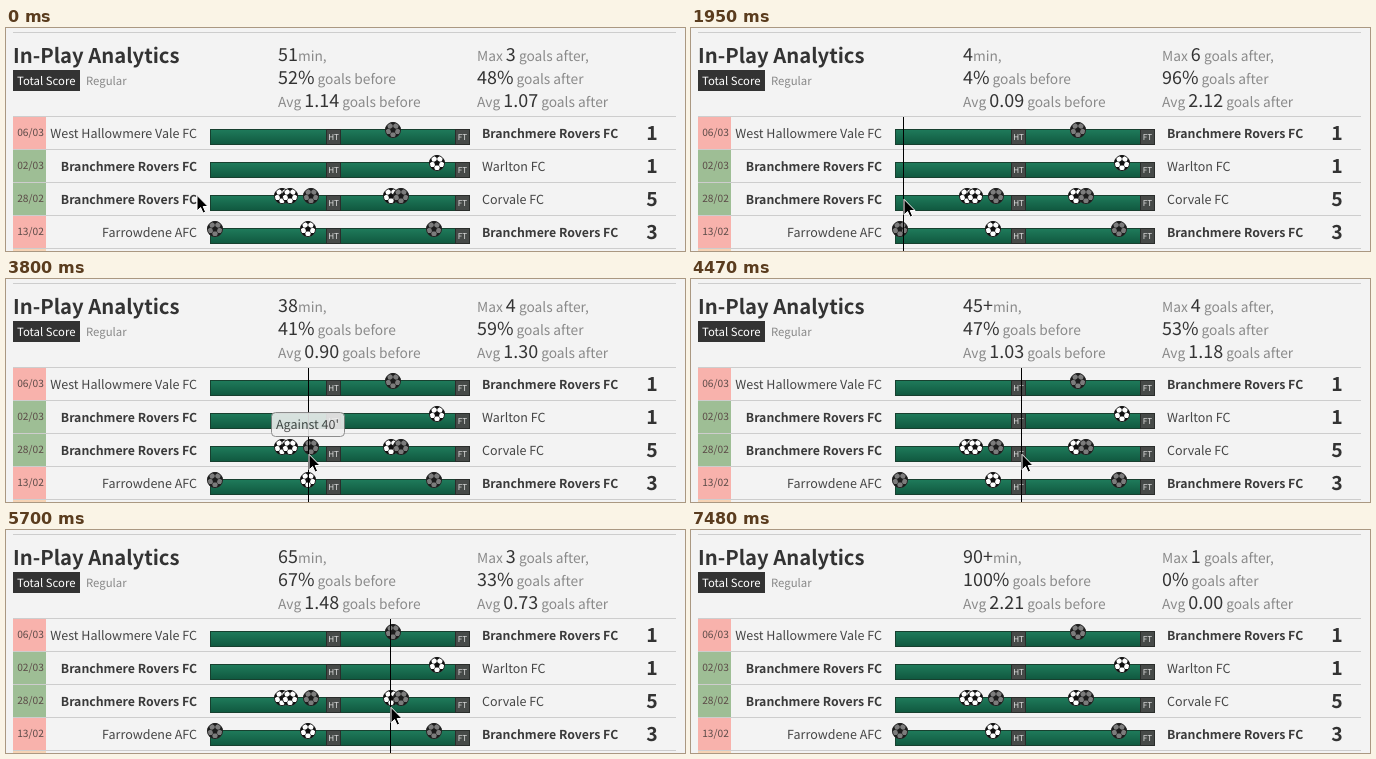
Write an HTML page that moves like this. It is 679 by 223 pixels and loops after 8.22 s.

```html
<!DOCTYPE html>
<html lang="en">
<head>
<meta charset="utf-8">
<title>In-Play Analytics</title>
<style>
html, body { margin: 0; width: 100%; height: 100%; overflow: hidden; background: #f3f3f3; }
svg { display: block; }
text {
  font-family: "Noto Sans CJK JP", "Noto Sans CJK SC", "Noto Sans CJK", "Open Sans", sans-serif;
  white-space: pre; text-rendering: geometricPrecision; fill: #444; font-size: 12.5px;
}
.title { font-size: 20.25px; font-weight: 700; fill: #333; }
.tab { font-size: 11.35px; fill: #888; }
.stat { font-size: 13.75px; fill: #8a8a8a; }
.stat .num { font-size: 17.95px; fill: #333; }
.date { font-size: 10.2px; fill: #5c4b48; text-anchor: middle; }
.home { text-anchor: end; }
.own { font-size: 12.3px; font-weight: 700; fill: #3a3a3a; }
.score { font-size: 19.4px; font-weight: 700; fill: #333; text-anchor: middle; }
.mark { font-size: 8.1px; fill: #e4e4e4; text-anchor: middle; }
</style>
</head>
<body>
<svg id="stage" width="679" height="223" viewBox="0 0 679 223"></svg>
<script>
const LOOP = 8220;
const TOP = 88, ROW = 33;                 // first row and row height
const KICK = 204, HALF = 320, SECOND = 334, FULL = 464;   // pitch x positions
const OWN = "Branchmere Rovers FC";
const LOST = "#f8b2ac", WON = "#9ebe95";

// balls for and against the own team, as x positions
const games = [
  { date: "06/03", tint: LOST, home: "West Hallowmere Vale FC", away: OWN, score: 1, own: [], against: [387] },
  { date: "02/03", tint: WON, home: OWN, away: "Warlton FC", score: 1, own: [431], against: [] },
  { date: "28/02", tint: WON, home: OWN, away: "Corvale FC", score: 5, own: [276, 284, 385], against: [305, 395] },
  { date: "13/02", tint: LOST, home: "Farrowdene AFC", away: OWN, score: 3, own: [302], against: [209, 428] }
];

// pointer moves; it rests in between
const rest = { x: 190, y: 167 };
const moves = [
  { from: 200, to: 640, x: 210, y: 167 },
  { from: 780, to: 1030, x: 233, y: 166 },
  { from: 1300, to: 1410, x: 234, y: 169 },
  { from: 1650, to: 1950, x: 212, y: 171 },
  { from: 2460, to: 2860, x: 234, y: 171 },
  { from: 2860, to: 3800, x: 302, y: 175 },
  { from: 3800, to: 5130, x: 358, y: 175 },
  { from: 5130, to: 6330, x: 413, y: 179 },
  { from: 6810, to: 7480, x: 470, y: 227 }
];
const HOVER_FROM = moves[3].from;

// average goals scored up to a minute
const TOTAL = 2.206;
const goals = [[0, 0], [12, .262], [38, .902], [51, 1.138], [55, 1.278], [77, 1.722], [91, TOTAL]];

const rect = (x, y, w, h, fill, more = "") =>
  `<rect x="${x}" y="${y}" width="${w}" height="${h}" fill="${fill}" ${more}/>`;
const text = (x, y, cls, str, more = "") =>
  `<text x="${x}" y="${y}" class="${cls}" ${more}>${str}</text>`;
const polar = (r, deg) => [r * Math.cos(deg * Math.PI / 180), r * Math.sin(deg * Math.PI / 180)];
const fifths = [0, 1, 2, 3, 4].map(i => 72 * i - 90);

function pentagon(cx, cy, r, turn) {
  const pts = fifths.map(a => {
    const [x, y] = polar(r, a + turn);
    return `${(cx + x).toFixed(2)},${(cy + y).toFixed(2)}`;
  });
  return `<polygon points="${pts.join(" ")}"/>`;
}

function ballSymbol(id, skin, ink) {
  const patches = fifths.map(a => pentagon(...polar(7.6, a), 2.6, a - 90)).join("");
  const seams = fifths.map(a => "M0 0L" + polar(7, a).map(v => v.toFixed(2)).join(" ")).join("");
  return `<g id="${id}"><circle r="7.7" fill="${skin}"/>
    <g clip-path="url(#round)" fill="${ink}">${pentagon(0, 0, 3.1, 0)}${patches}
      <path d="${seams}" stroke="${ink}" stroke-width=".6"/></g>
    <circle r="7.6" fill="none" stroke="${ink}" stroke-width=".9"/></g>`;
}

const marker = (x, y, str) =>
  rect(x + .5, y + .5, 14, 15, "#464a48", 'stroke="#2a2d2b"') + text(x + 7.5, y + 10.6, "mark", str);

function gameRow(g, i) {
  const y = TOP + ROW * i, bar = y + 13;
  const cls = name => name === OWN ? "own" : "";
  const balls = (xs, id) => xs.map(x => `<use href="#${id}" x="${x}" y="${y + 14}"/>`).join("");
  return rect(7, y + 1, 33, ROW - 1, g.tint) +
    text(24.5, y + 20.3, "date", g.date) +
    text(191, y + 22, "home " + cls(g.home), g.home) +
    rect(KICK + .5, bar + .5, FULL - KICK - 1, 15, "url(#pitch)", 'stroke="#17402f"') +
    marker(HALF, bar, "HT") + marker(FULL - 15, bar, "FT") +
    balls(g.own, "white") + balls(g.against, "grey") +
    text(476, y + 22, cls(g.away), g.away) +
    text(646, y + 24, "score", g.score);
}

const rule = y => rect(7, y, 663, 1, "#cdcdcd");
const statLines = (x, side) =>
  [0, 1, 2].map(i => text(x, 33 + 23 * i, "stat", "", `id="${side}${i}"`)).join("");

document.getElementById("stage").innerHTML = `
  <defs>
    <linearGradient id="pitch" x2="0" y2="1">
      <stop offset="0" stop-color="#1f7b5b"/><stop offset="1" stop-color="#10583f"/>
    </linearGradient>
    <clipPath id="round"><circle r="7.7"/></clipPath>
    ${ballSymbol("white", "#fff", "#111")}${ballSymbol("grey", "#7c7c7c", "#1e1e1e")}
  </defs>
  ${rect(0, 0, 679, 223, "#f3f3f3")}
  ${text(7, 35, "title", "In-Play Analytics")}
  ${rect(7, 42, 67, 21, "#333")}
  ${text(11, 57, "tab", "Total Score", 'style="fill:#fff"')}
  ${text(80, 57, "tab", "Regular")}
  ${statLines(272, "left")}${statLines(471, "right")}
  ${games.map(gameRow).join("")}
  ${rule(4)}${[0, 1, 2, 3, 4].map(i => rule(TOP + ROW * i)).join("")}
  ${rect(7, 221, 33, 2, "#f6d3b4")}
  <rect id="line" y="89" width="1" height="134" fill="#000"/>
  <g id="tip" opacity=".88">
    ${rect(265.5, 133.5, 73, 24, "#f1f1f1", 'rx="4" stroke="#808080"')}
    ${text(270, 150, "", "Against 40'")}
  </g>
  <path id="arrow" d="M0 0V15.6L3.6 12.2L6.1 17.8L8.6 16.7L6.2 11.2H11Z" fill="#000" stroke="#fff"/>`;

const el = id => document.getElementById(id);
const mix = (a, b, k) => a + (b - a) * k;

function pointer(t) {
  let { x, y } = rest;
  for (const m of moves) {
    const k = Math.min(1, Math.max(0, (t - m.from) / (m.to - m.from)));
    x = mix(x, m.x, k);
    y = mix(y, m.y, k);
  }
  return [Math.round(x), Math.round(y)];
}

function goalsBefore(minute) {
  const i = Math.max(1, goals.findIndex(g => g[0] >= minute));
  const [m0, g0] = goals[i - 1], [m1, g1] = goals[i];
  return mix(g0, g1, (minute - m0) / (m1 - m0));
}

// playing minute under the line; the half-time gap counts as 45+
function minuteAt(x) {
  if (x <= HALF) return [Math.ceil((x - KICK) / 2.58), ""];
  if (x <= SECOND) return [45, "+"];
  const m = 45 + Math.ceil((x - SECOND) / 2.5);
  return m > 90 ? [91, "+"] : [m, ""];
}

const num = str => `<tspan class="num">${str}</tspan>`;

let shown = "";
function showStats(minute, plus) {
  if (minute + plus === shown) return;
  shown = minute + plus;
  const before = goalsBefore(minute), pct = Math.round(before / TOTAL * 100);
  const most = 6 - Math.floor((minute + 12) / 20);
  el("left0").innerHTML = num(Math.min(minute, 90) + plus) + "min,";
  el("left1").innerHTML = num(pct + "%") + " goals before";
  el("left2").innerHTML = "Avg " + num(before.toFixed(2)) + " goals before";
  el("right0").innerHTML = "Max " + num(most) + " goals after,";
  el("right1").innerHTML = num(100 - pct + "%") + " goals after";
  el("right2").innerHTML = "Avg " + num((TOTAL - before).toFixed(2)) + " goals after";
}

const show = (id, on) => { el(id).style.display = on ? "" : "none"; };

function draw(t) {
  const [x, y] = pointer(t), hover = t > HOVER_FROM;
  showStats(...(hover ? minuteAt(x) : [51, ""]));
  el("line").setAttribute("x", x);
  show("line", hover && x < FULL);
  show("tip", Math.hypot(x + 1 - 305, y - 168) < 8);
  el("arrow").setAttribute("transform", `translate(${x + 1} ${y + .3})`);
}

const start = performance.now();
function tick() {
  draw((performance.now() - start) % LOOP);
  requestAnimationFrame(tick);
}
tick();
</script>
</body>
</html>
```
